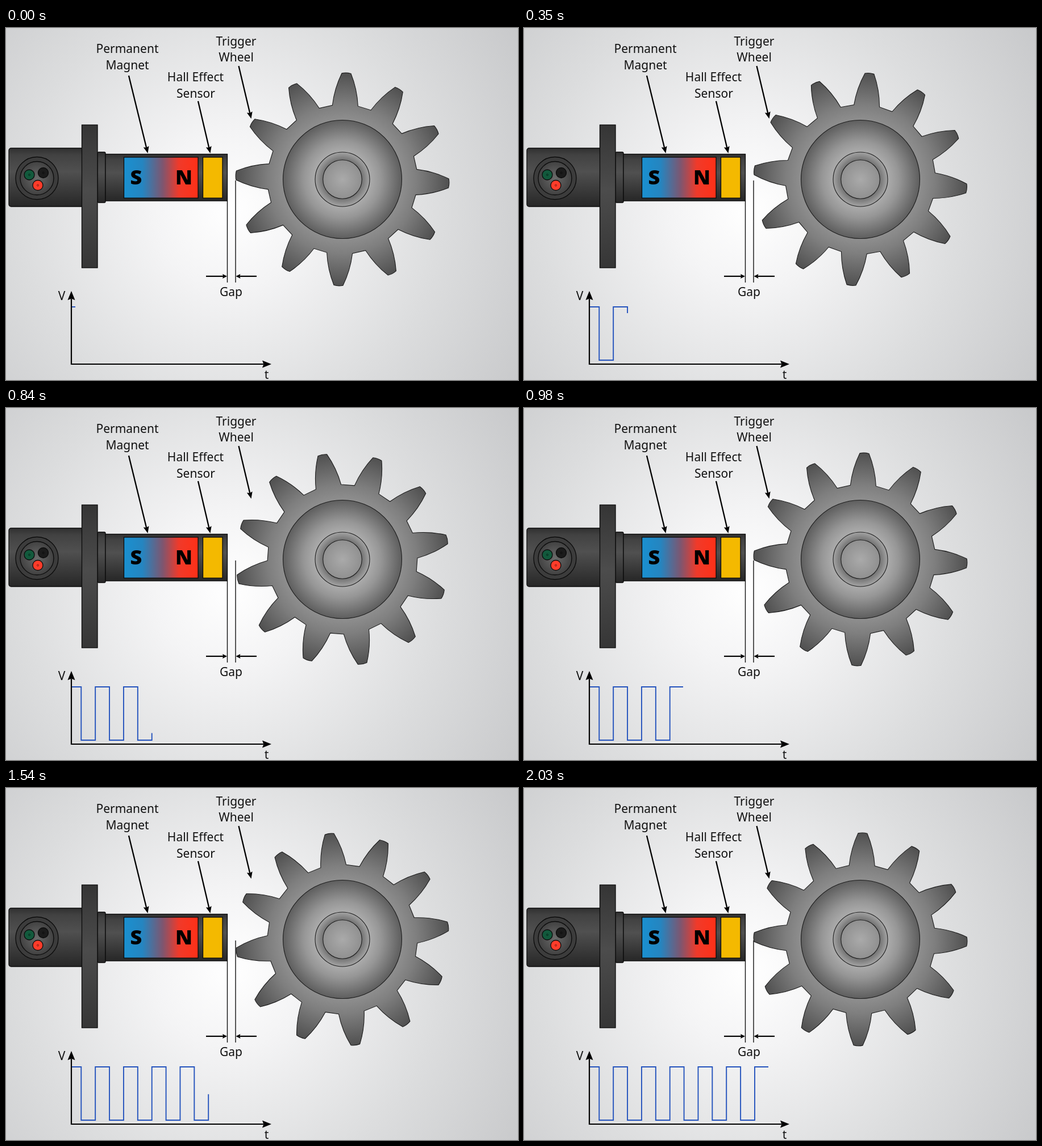
Recreate the animation shown at these times as an HTML page. Size 901 px wide and 621 px high, loop 2.1 s.

```html
<!DOCTYPE html>
<html lang="en">
<head>
<meta charset="utf-8">
<title>Hall effect sensor</title>
<style>
html, body { margin: 0; width: 100%; height: 100%; overflow: hidden; background: #d4d5d6; }
svg { display: block; width: 901px; height: 621px; }
text { font-family: "Noto Sans", "Open Sans", sans-serif; font-size: 21px; text-anchor: middle; fill: #111; }
.pole { font-family: "Open Sans", "Noto Sans", sans-serif; font-size: 36px; font-weight: 800; fill: #000; }
.edge { stroke: #0b0b0b; stroke-width: 1.3; }
</style>
</head>
<body>
<svg viewBox="0 0 901 621">
  <defs>
    <radialGradient id="back" gradientUnits="userSpaceOnUse" cx="395" cy="320" r="620">
      <stop offset="0" stop-color="#fff"/>
      <stop offset=".22" stop-color="#f4f4f5"/>
      <stop offset=".6" stop-color="#dcddde"/>
      <stop offset="1" stop-color="#c6c7c9"/>
    </radialGradient>
    <linearGradient id="steel" x2="0" y2="1">
      <stop offset="0" stop-color="#303030"/>
      <stop offset=".12" stop-color="#424242"/>
      <stop offset=".4" stop-color="#505050"/>
      <stop offset=".75" stop-color="#383838"/>
      <stop offset="1" stop-color="#272727"/>
    </linearGradient>
    <linearGradient id="flange" x2="0" y2="1">
      <stop offset="0" stop-color="#353535"/>
      <stop offset=".45" stop-color="#4c4c4c"/>
      <stop offset="1" stop-color="#363636"/>
    </linearGradient>
    <linearGradient id="magnet">
      <stop offset="0" stop-color="#1a90d0"/>
      <stop offset=".25" stop-color="#2585c0"/>
      <stop offset=".52" stop-color="#7d5670"/>
      <stop offset=".74" stop-color="#f03a2a"/>
      <stop offset="1" stop-color="#ff3017"/>
    </linearGradient>
    <radialGradient id="teeth" gradientUnits="userSpaceOnUse" cx="0" cy="0" r="188">
      <stop offset=".5" stop-color="#959595"/>
      <stop offset=".7" stop-color="#7e7e7e"/>
      <stop offset="1" stop-color="#505050"/>
    </radialGradient>
    <radialGradient id="disc">
      <stop offset=".4" stop-color="#b2b2b2"/>
      <stop offset=".65" stop-color="#969696"/>
      <stop offset="1" stop-color="#5e5e5e"/>
    </radialGradient>
    <radialGradient id="ring">
      <stop offset=".68" stop-color="#6c6c6c"/>
      <stop offset="1" stop-color="#a4a4a4"/>
    </radialGradient>
    <radialGradient id="bore">
      <stop offset="0" stop-color="#aaa"/>
      <stop offset="1" stop-color="#909090"/>
    </radialGradient>
    <radialGradient id="socket">
      <stop offset="0" stop-color="#6a6a6a"/>
      <stop offset="1" stop-color="#414141"/>
    </radialGradient>
  </defs>

  <rect width="901" height="621" fill="url(#back)"/>

  <g class="edge">
    <rect x="5" y="212" width="132" height="103" rx="4" fill="url(#steel)"/>
    <rect x="161" y="219" width="14" height="89" rx="2" fill="url(#steel)"/>
    <rect x="175" y="222.5" width="214.5" height="82.5" fill="url(#steel)"/>
    <rect x="133.5" y="171" width="27.5" height="252" fill="url(#flange)"/>
    <rect x="207.5" y="228" width="130.5" height="72" fill="url(#magnet)"/>
    <rect x="346.5" y="228" width="34.5" height="72" fill="#f4b900"/>
    <circle cx="54.5" cy="265" r="37.5" fill="#3c3c3c"/>
    <circle cx="54.5" cy="265" r="29.5" fill="url(#socket)"/>
    <circle cx="41" cy="259" r="9" fill="#12593c"/>
    <circle cx="65.5" cy="255.5" r="9" fill="#1b1b1b"/>
    <circle cx="56" cy="277.5" r="9" fill="#ff3c2a"/>
  </g>
  <g fill="none" stroke="#000" stroke-opacity=".5">
    <circle cx="41" cy="259" r="1.5"/>
    <circle cx="65.5" cy="255.5" r="1.5"/>
    <circle cx="56" cy="277.5" r="1.5"/>
  </g>
  <text class="pole" x="229" y="276">S</text>
  <text class="pole" x="313" y="276">N</text>

  <g transform="translate(592 267)" stroke="#1c1c1c" stroke-width="1.1">
    <path id="gear" fill="url(#teeth)"/>
    <circle r="104.5" fill="url(#disc)"/>
    <circle r="48" fill="url(#ring)"/>
    <circle r="34.3" fill="url(#bore)"/>
  </g>

  <path d="M389.5 305V449M404 269V449" stroke="#111" stroke-width="1.4"/>
  <path id="wave" fill="none" stroke="#2453bd" stroke-width="1.9"/>
  <g id="arrows"></g>
  <g id="labels"></g>
</svg>
<script>
const $ = id => document.getElementById(id);

function add(parent, tag, attrs, text = "") {
  const el = document.createElementNS("http://www.w3.org/2000/svg", tag);
  for (const key in attrs) el.setAttribute(key, attrs[key]);
  el.textContent = text;
  parent.append(el);
}

function arrow(x1, y1, x2, y2, width, head, half) {
  const length = Math.hypot(x2 - x1, y2 - y1);
  const ux = (x2 - x1) / length, uy = (y2 - y1) / length;
  const bx = x2 - ux * head, by = y2 - uy * head;
  const nx = -uy * half, ny = ux * half;
  const inX = bx + ux * head * 0.15, inY = by + uy * head * 0.15;
  add($("arrows"), "path", { d: `M${x1} ${y1}L${inX} ${inY}`, stroke: "#000", "stroke-width": width });
  add($("arrows"), "path", { d: `M${x2} ${y2}L${bx + nx} ${by + ny}L${inX} ${inY}L${bx - nx} ${by - ny}Z` });
}

arrow(216, 84, 249.5, 221, 2.3, 12, 5);
arrow(338, 129, 359.5, 221, 2.3, 12, 5);
arrow(409.5, 67, 431.5, 160, 2.3, 12, 5);
arrow(352, 438, 389, 438, 2.2, 8, 4);
arrow(441, 438, 404.5, 438, 2.2, 8, 4);
arrow(115, 594, 115, 464, 2.2, 16, 6.5);
arrow(114, 593, 467, 593, 2.2, 16, 6.5);

[
  ["Permanent", 213.5, 44], ["Magnet", 213.5, 73],
  ["Hall Effect", 333.5, 94], ["Sensor", 334, 122.5],
  ["Trigger", 405, 31], ["Wheel", 405, 59],
  ["Gap", 396, 473], ["V", 98, 480], ["t", 458.5, 619]
].forEach(([text, x, y]) => add($("labels"), "text", { x, y }, text));

// One tooth, pointing up, repeated around the wheel.
function gearPath() {
  const points = [[-22.5, -130], [-20, -160], [-8, -187], [0, -189], [8, -187], [20, -160], [22.5, -130]];
  let d = "";
  for (let i = 0; i < 12; i++) {
    const a = i * Math.PI / 6, c = Math.cos(a), s = Math.sin(a);
    const p = points.map(([x, y]) => `${(x * c - y * s).toFixed(2)} ${(x * s + y * c).toFixed(2)}`);
    d += `${i ? "L" : "M"}${p[0]}Q${p[1]} ${p[2]}Q${p[3]} ${p[4]}Q${p[5]} ${p[6]}`;
  }
  return d + "Z";
}

function wavePath() {
  let d = "M115 492";
  for (let i = 0; i < 12; i++) d += `H${132.3 + i * 24.88}V${i % 2 ? 492 : 586}`;
  return d + "H430";
}

$("gear").setAttribute("d", gearPath());
$("wave").setAttribute("d", wavePath());

const STEP = 70, STEPS = 30;
// step, wheel angle in degrees, drawn length of the signal
const keys = [
  [0, 2.15, 7], [5, 34.9, 266], [9, 59.7, 467], [14, 92.15, 729],
  [17, 111.9, 888], [22, 143, 1133], [28, 181.2, 1443], [29, 181.2, 1443]
];

function pose(step) {
  const i = keys.findIndex(key => key[0] >= step);
  if (i < 1) return keys[0].slice(1);
  const a = keys[i - 1], b = keys[i], k = (step - a[0]) / (b[0] - a[0]);
  return [1, 2].map(n => a[n] + (b[n] - a[n]) * k);
}

const start = performance.now();
function draw() {
  const time = Math.max(0, performance.now() - start);
  const [angle, length] = pose(Math.floor(time / STEP) % STEPS);
  $("gear").setAttribute("transform", `rotate(${angle})`);
  $("wave").setAttribute("stroke-dasharray", `${length} 2000`);
  requestAnimationFrame(draw);
}
draw();
</script>
</body>
</html>
```
